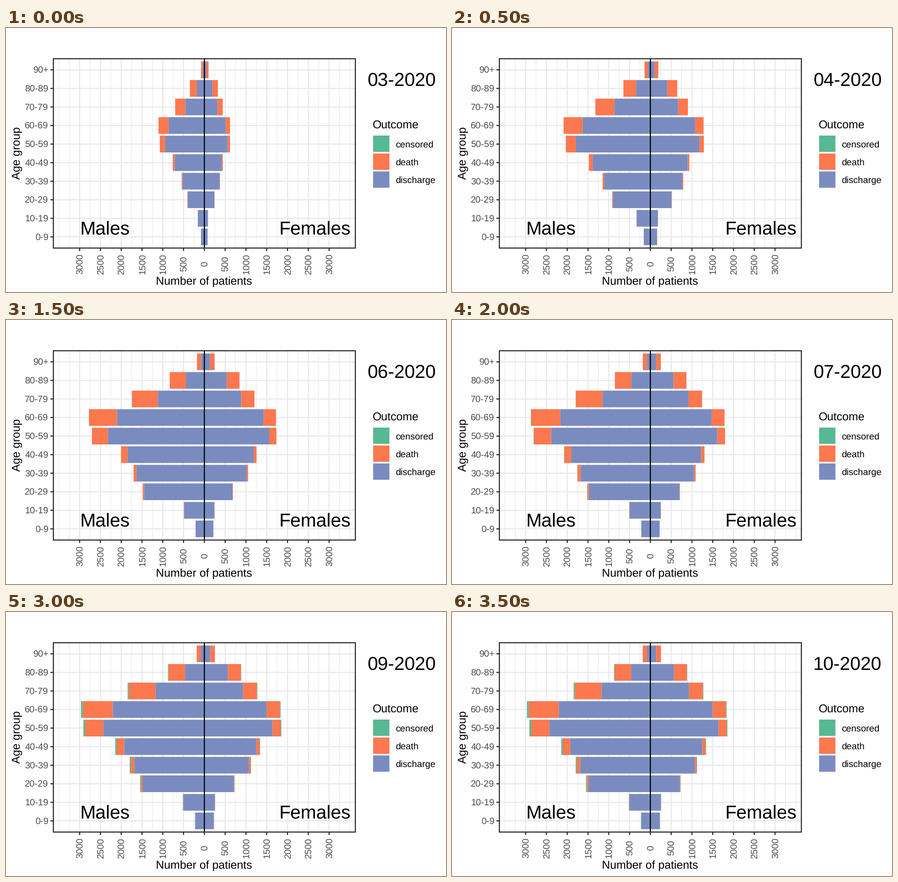
A matplotlib script for the animation above (4 s loop, 966 px wide and 579 px high).

```python
import numpy as np
import matplotlib.pyplot as plt
from matplotlib.animation import FuncAnimation
from matplotlib.patches import Rectangle

W, H, DPI = 966, 579, 64
PT = 72 / DPI                    # points per pixel
plt.rcParams["font.family"] = "Liberation Sans"
plt.rcParams["text.hinting"] = "none"

GREEN, ORANGE, BLUE = "#57b894", "#fc784f", "#7a8cbf"
FRAME, GRID, TICK_TEXT = "#222222", "#e8e8e8", "#4d4d4d"
LEFT, RIGHT, TOP, BOTTOM = 104, 767, 67.4, 482.6
ZERO, SCALE = 435.5, 0.09127     # pixel of zero, pixels per patient
ROW0, PITCH, BAR = 91.8, 40.7, 36.6
SMALL, MEDIUM, LARGE = 20.2, 24.95, 41.0

MONTHS, LAST = 8, 6              # no new patients after month LAST
AGE = np.arange(95, 0, -10)      # middle of each age group
NAMES = ["90+"] + [f"{a - 5}-{a + 4}" for a in AGE[1:]]


def side(sign, discharged, start, late, odds_shift, censored):
    """Return a function giving the three outcomes per age group by month."""
    discharged = np.array(discharged)
    # Young adults may arrive later: lower start, steeper rise
    lag = late * np.exp(-((AGE - 25) / 15) ** 2)
    # Odds of death fall with every decade below the oldest group
    u = (95 - AGE) / 10
    deaths = discharged * (0.01 + np.exp(odds_shift - 0.33 * u - 0.04 * u**2))
    death_start = np.clip(0.3 + 0.0045 * (AGE - 58), 0.12, 0.5)
    death_rate = np.clip(0.015 * AGE - 0.375, 0.4, 1)

    def outcomes(month):
        t = min(month, LAST)
        cured = 1 - (1 - start + 0.12 * lag) * np.exp(
            -(0.84 - 0.22 * lag) * t ** (1 + 0.55 * lag))
        died = 1 - (1 - death_start) * np.exp(-death_rate * t ** 1.2)
        open_cases = censored * np.clip((t - 3) / 3, 0, 1) ** 1.5
        return (discharged * cured, deaths * died,
                (discharged + deaths) * open_cases)

    return sign, outcomes


# Final discharges per group, oldest first, then the shape of the growth
SIDES = [
    side(-1, [82, 466, 1178, 2213, 2438, 1934, 1687, 1485, 502, 221],
         start=0.39, late=1, odds_shift=0.2, censored=0.015),
    side(1, [142, 570, 937, 1507, 1649, 1255, 1079, 712, 255, 228],
         start=0.34, late=0, odds_shift=-0.25, censored=0.009)]


fig = plt.figure(figsize=(W / DPI, H / DPI), dpi=DPI, facecolor="white")
ax = fig.add_axes([0, 0, 1, 1])
ax.set_xlim(0, W)
ax.set_ylim(H, 0)
ax.axis("off")


def line(x0, y0, x1, y1, color, width, z):
    ax.plot([x0, x1], [y0, y1], color=color, lw=width * PT, zorder=z,
            solid_capstyle="butt", snap=False)


def rect(x, y, w, h, color, z=3):
    return ax.add_patch(Rectangle((x, y), w, h, facecolor=color, lw=0,
                                  zorder=z, snap=False))


def label(x, y, s, size, color="black", **kw):
    return ax.text(x, y, s, fontsize=size * PT, color=color, zorder=8,
                   va="baseline", rotation_mode="anchor", **kw)


# Grid, ticks and tick labels
for n in range(-3500, 3501, 250):
    x = ZERO + n * SCALE
    major = n % 500 == 0 and abs(n) <= 3000
    line(x, TOP, x, BOTTOM, GRID, 2.3 if major else 1.15, 1)
    if major:
        line(x, BOTTOM, x, BOTTOM + 6.5, FRAME, 2.3, 6)
        label(x + 7.3, 517.5, str(abs(n)), SMALL, TICK_TEXT,
              rotation=90, ha="center")
rows = ROW0 + PITCH * np.arange(10)
for y, name in zip(rows, NAMES):
    line(LEFT, y, RIGHT, y, GRID, 2.3, 2)
    line(LEFT - 6.5, y, LEFT, y, FRAME, 2.3, 6)
    label(93.1, y + 7.3, name, SMALL, TICK_TEXT, ha="right")

# Panel border and centre line
line(ZERO, TOP, ZERO, BOTTOM, "black", 2.4, 5)
ax.add_patch(Rectangle((LEFT, TOP), RIGHT - LEFT, BOTTOM - TOP, fill=False,
                       ec=FRAME, lw=2.3 * PT, zorder=7, snap=False))

# Titles and legend
label(329.4, 562.7, "Number of patients", MEDIUM)
label(30.5, 332.5, "Age group", MEDIUM, rotation=90)
label(162.8, 453.3, "Males", LARGE)
label(600.1, 453.3, "Females", LARGE)
label(804.4, 219.7, "Outcome", MEDIUM)
for i, (name, color) in enumerate([("censored", GREEN), ("death", ORANGE),
                                   ("discharge", BLUE)]):
    y = 253.8 + 39.35 * i
    rect(806, y - 17.9, 35.8, 35.8, color)
    label(855.5, y + 7.6, name, SMALL)
date = label(793.3, 127.6, "", LARGE)

# Stacked segments growing outwards from zero on both sides
bars = [[[rect(ZERO, y - BAR / 2, 0, BAR, c) for y in rows]
         for c in (BLUE, ORANGE, GREEN)] for _ in SIDES]


def draw(month):
    date.set_text(f"{month + 3:02d}-2020")
    for (sign, outcomes), stack in zip(SIDES, bars):
        edge = np.full(10, ZERO)
        for part, patches in zip(outcomes(month), stack):
            step = sign * part * SCALE
            for p, x, w in zip(patches, edge, step):
                p.set_x(x)
                p.set_width(w)
            edge = edge + step
    return [date]


anim = FuncAnimation(fig, draw, frames=MONTHS, interval=500, repeat=True,
                     repeat_delay=0, blit=False)
plt.show()
```
